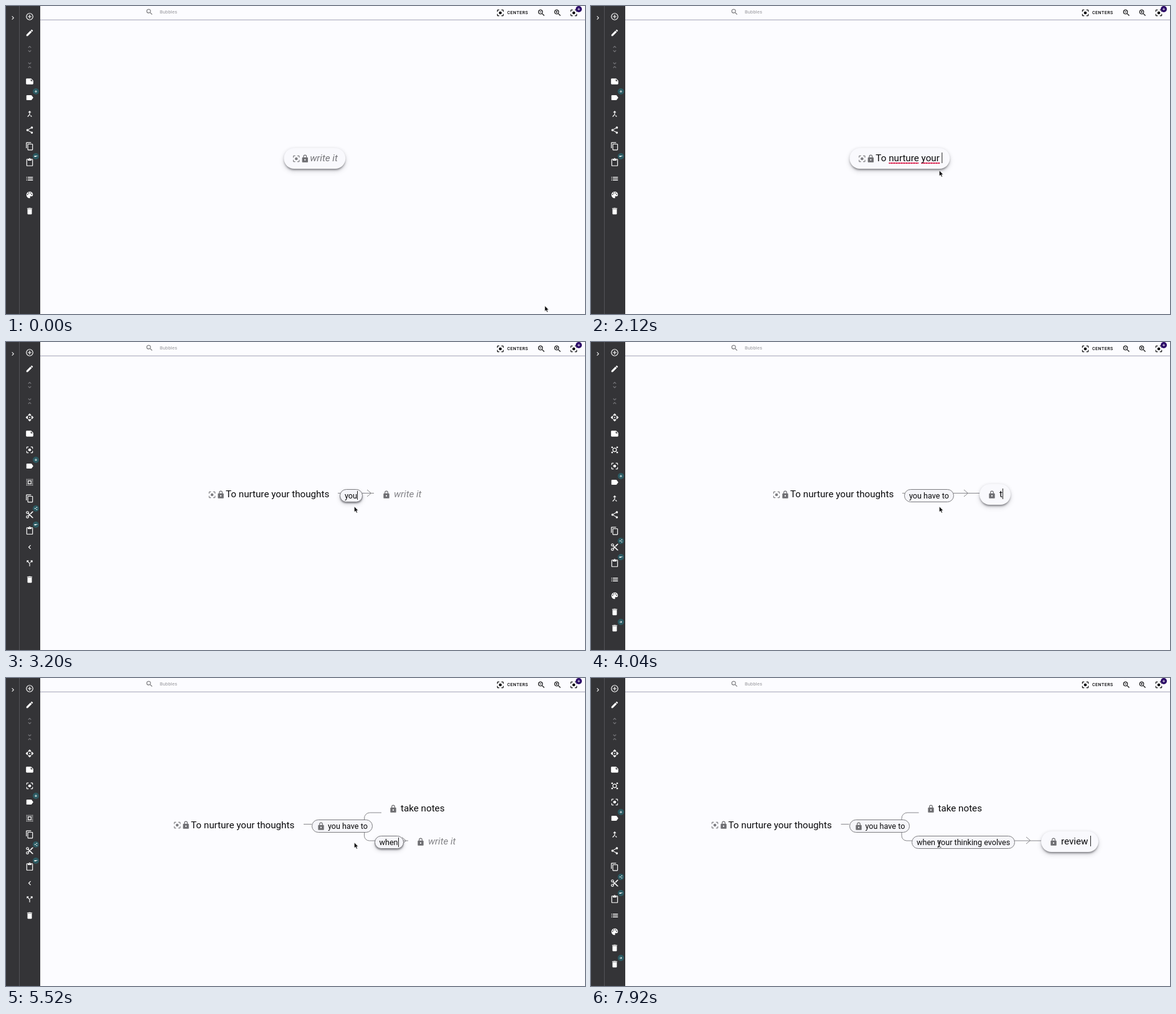
These frames come from a looping animation (930 px wide and 494 px high, 8000 ms). An HTML page:

```html
<!DOCTYPE html>
<html lang="en">
<head>
<meta charset="utf-8">
<title>Bubble map</title>
<style>
html, body { margin: 0; width: 100%; height: 100%; overflow: hidden; background: #fcfcff; }
body { position: relative; font-family: Roboto, Arial, sans-serif; color: #0a0a0c; }
svg { display: block; overflow: visible; fill: currentColor; fill-rule: evenodd; flex: none; }
.at { position: absolute; }
#stage { position: absolute; left: 0; top: 0; width: 930px; height: 494px; overflow: hidden; }
#bar { left: 55px; top: 0; width: 875px; height: 21px; background: #fcfcff; border-bottom: 1px solid #e6e6ee; }
#bar::after { content: ""; position: absolute; left: 0; right: 0; top: 22px; height: 1px; background: #b8b8c6; }
#side { left: 0; top: 0; width: 55px; height: 494px; background: #343437; color: #fff; }
#side::before { content: ""; position: absolute; left: 21px; width: 1px; height: 100%; background: #545458; }
#search { left: 247px; top: 4px; font-size: 7.6px; line-height: 11px; letter-spacing: .1px; color: #98989c; }
#centers { left: 805px; top: 5px; font-size: 7px; line-height: 12px; font-weight: 500; letter-spacing: .52px; }
.badge { width: 10px; height: 10px; border-radius: 50%; background: #2c5a62; color: #fff; display: grid; place-items: center; }
.scene, .tools { inset: 0; }
.wires { left: 0; top: 0; fill: none; stroke: #88888c; stroke-width: 1; }

.node, .label { position: absolute; display: flex; align-items: center; white-space: pre; box-sizing: border-box; }
.node { height: 33px; border-radius: 17px; padding: 0 13px; font-size: 15.2px; line-height: 32px; }
.node svg, .label svg { color: #6e6e72; }
.node.root svg:first-child { color: #808084; }
.node span { margin: 0 0 1px 5px; }
.node.root span { margin-left: 1px; }
.node.on { background: #f9f9fd; box-shadow: 0 3px 3px -1px rgba(60, 60, 66, .5), 0 4px 7px rgba(90, 90, 100, .25), 0 0 4px rgba(120, 120, 130, .14); }
.label { height: 21px; border-radius: 11px; padding: 0 7px; border: 1px solid #7c7c80; background: #f5f5f9; font-size: 12.6px; line-height: 19px; }
.label.hub span { margin-left: 4px; }
.label.edit { padding-right: 8px; box-shadow: 0 2px 2px rgba(60, 60, 66, .42), 0 3px 6px rgba(90, 90, 100, .25); }
em { color: #747478; }
.pale em { color: #838387; }
u { text-decoration: none; background: repeating-linear-gradient(90deg, #d6204c 0 2px, #e4587a 2px 4px) 0 calc(100% - .5px) / 100% 2px no-repeat; }
.caret { display: inline-block; width: 1px; height: 1.12em; margin-right: -1px; vertical-align: -.2em; background: #222; }
#mouse { left: 0; top: 0; }
</style>
</head>
<body>
<div id="stage">
  <div id="bar" class="at"></div>
  <div id="side" class="at"></div>
  <div id="search" class="at">Bubbles</div>
  <div id="centers" class="at">CENTERS</div>
</div>
<script>
const lens = 'M15.5 14h-.79l-.28-.27A6.47 6.47 0 0 0 16 9.5 6.5 6.5 0 1 0 9.5 16c1.61 0 3.09-.59 4.23-1.57l.27.28v.79l5 4.99L20.49 19zm-6 0a4.5 4.5 0 1 1 0-9 4.5 4.5 0 0 1 0 9z';
const icons = {
  add: 'M13 7h-2v4H7v2h4v4h2v-4h4v-2h-4zM12 2a10 10 0 1 0 0 20 10 10 0 0 0 0-20zm0 18a8 8 0 1 1 0-16 8 8 0 0 1 0 16z',
  edit: 'M3 17.25V21h3.75L17.81 9.94l-3.75-3.75zM20.71 7.04a1 1 0 0 0 0-1.41l-2.34-2.34a1 1 0 0 0-1.41 0l-1.83 1.83 3.75 3.75z',
  more: 'M12 5.83L15.17 9l1.41-1.41L12 3 7.41 7.59 8.83 9zm0 12.34L8.83 15l-1.41 1.41L12 21l4.59-4.59L15.17 15z',
  less: 'M7.41 18.59L8.83 20 12 16.83 15.17 20l1.41-1.41L12 14zm9.18-13.18L15.17 4 12 7.17 8.83 4 7.41 5.41 12 10z',
  note: 'M22 10l-6-6H4a2 2 0 0 0-2 2v12a2 2 0 0 0 2 2h16a2 2 0 0 0 2-2zm-7-4.5l5.5 5.5H15z',
  label: 'M17.63 5.84A2 2 0 0 0 16 5H5a2 2 0 0 0-2 2v10a2 2 0 0 0 2 2h11a2 2 0 0 0 1.63-.84L22 12z',
  merge: 'M17 20.41L18.41 19 15 15.59 13.59 17zM7.5 8H11v5.59L5.59 19 7 20.41l6-6V8h3.5L12 3.5z',
  share: 'M18 16.08c-.76 0-1.44.3-1.96.77L8.91 12.7a3 3 0 0 0 0-1.4l7.05-4.11A3 3 0 1 0 15.09 5.7L8.04 9.81a3 3 0 1 0 0 4.38l7.12 4.16A2.92 2.92 0 1 0 18 16.08z',
  copy: 'M16 1H4a2 2 0 0 0-2 2v14h2V3h12zm3 4H8a2 2 0 0 0-2 2v14a2 2 0 0 0 2 2h11a2 2 0 0 0 2-2V7a2 2 0 0 0-2-2zm0 16H8V7h11z',
  paste: 'M19 2h-4.18a3 3 0 0 0-5.64 0H5a2 2 0 0 0-2 2v16a2 2 0 0 0 2 2h14a2 2 0 0 0 2-2V4a2 2 0 0 0-2-2zm-7 0a1 1 0 1 1 0 2 1 1 0 0 1 0-2zm7 18H5V4h2v3h10V4h2z',
  list: 'M3 7h2v2H3zm0 4h2v2H3zm0 4h2v2H3zM7 7h14v2H7zm0 4h14v2H7zm0 4h14v2H7z',
  palette: 'M12 3a9 9 0 0 0 0 18c.83 0 1.5-.67 1.5-1.5 0-.39-.15-.74-.39-1.01-.23-.26-.38-.61-.38-.99 0-.83.67-1.5 1.5-1.5H16a5 5 0 0 0 5-5c0-4.42-4.03-8-9-8zM6.5 9a1.5 1.5 0 1 1 0 3 1.5 1.5 0 0 1 0-3zm3-4a1.5 1.5 0 1 1 0 3 1.5 1.5 0 0 1 0-3zm5 0a1.5 1.5 0 1 1 0 3 1.5 1.5 0 0 1 0-3zm3 4a1.5 1.5 0 1 1 0 3 1.5 1.5 0 0 1 0-3z',
  trash: 'M6 19a2 2 0 0 0 2 2h8a2 2 0 0 0 2-2V7H6zM19 4h-3.5l-1-1h-5l-1 1H5v2h14z',
  focus: 'M12 8a4 4 0 1 0 0 8 4 4 0 0 0 0-8zm-7 7H3v4a2 2 0 0 0 2 2h4v-2H5zM5 5h4V3H5a2 2 0 0 0-2 2v4h2zm14-2h-4v2h4v4h2V5a2 2 0 0 0-2-2zm0 16h-4v2h4a2 2 0 0 0 2-2v-4h-2z',
  lock: 'M18 8h-1V6A5 5 0 0 0 7 6v2H6a2 2 0 0 0-2 2v10a2 2 0 0 0 2 2h12a2 2 0 0 0 2-2V10a2 2 0 0 0-2-2zm-6 9a2 2 0 1 1 0-4 2 2 0 0 1 0 4zm3.1-9H8.9V6a3.1 3.1 0 0 1 6.2 0z',
  move: 'M14 12l-2 2-2-2 2-2zM12 6l2.12 2.12 2.5-2.5L12 1 7.38 5.62l2.5 2.5zM6 12l2.12-2.12-2.5-2.5L1 12l4.62 4.62 2.5-2.5zm12 0l-2.12 2.12 2.5 2.5L23 12l-4.62-4.62-2.5 2.5zm-6 6l-2.12-2.12-2.5 2.5L12 23l4.62-4.62-2.5-2.5z',
  frame: 'M12 6a6 6 0 1 0 0 12 6 6 0 0 0 0-12zm0 2a4 4 0 1 1 0 8 4 4 0 0 1 0-8zM3 3h4v4H3zm14 0h4v4h-4zM3 17h4v4H3zm14 0h4v4h-4z',
  all: 'M3 3h2v2H3zm4 0h2v2H7zm4 0h2v2h-2zm4 0h2v2h-2zm4 0h2v2h-2zM3 7h2v2H3zm0 4h2v2H3zm0 4h2v2H3zm0 4h2v2H3zM19 7h2v2h-2zm0 4h2v2h-2zm0 4h2v2h-2zm0 4h2v2h-2zM7 19h2v2H7zm4 0h2v2h-2zm4 0h2v2h-2zM7 7h10v10H7zm2 2v6h6V9z',
  cut: 'M9.64 7.64A4 4 0 1 0 7.64 9.64L10 12l-2.36 2.36a4 4 0 1 0 2 2L12 14l7 7h3v-1zM6 8a2 2 0 1 1 0-4 2 2 0 0 1 0 4zm0 12a2 2 0 1 1 0-4 2 2 0 0 1 0 4zM19 3l-6 6 2 2 7-7V3z',
  left: 'M15.41 7.41L14 6l-6 6 6 6 1.41-1.41L10.83 12z',
  right: 'M8.59 16.59L10 18l6-6-6-6-1.41 1.41L13.17 12z',
  split: 'M14 4l2.29 2.29-2.88 2.88 1.42 1.42 2.88-2.88L20 10V4zm-4 0H4v6l2.29-2.29 4.71 4.7V20h2v-8.41l-5.29-5.3z',
  search: lens,
  zoomOut: lens + 'M7 8.6h5v1.6H7z',
  zoomIn: lens + 'M12 10.2h-1.7v1.8H8.7v-1.8H7V8.6h1.7V7h1.6v1.6H12z',
  plus: 'M20 13.5h-6.5V20h-3v-6.5H4v-3h6.5V4h3v6.5H20z',
  minus: 'M2 9h20v3H14v4H2z',
  arrow: 'M3 10.5h11L10 7l2-2 8 7-8 7-2-2 4-3.5H3z'
};
const stage = document.getElementById('stage');
const side = document.getElementById('side');

const icon = (name, size = 14) =>
  `<svg width="${size}" height="${size}" viewBox="0 0 24 24"><path d="${icons[name]}"/></svg>`;

function add(parent, cls, html = '', style = '') {
  const el = document.createElement('div');
  el.className = cls;
  el.innerHTML = html;
  el.style.cssText = style;
  parent.append(el);
  return el;
}
const iconAt = (parent, name, x, y, size = 14, color = 'inherit') =>
  add(parent, 'at', icon(name, size), `left:${x - size / 2}px;top:${y - size / 2}px;color:${color}`);
const badgeAt = (parent, name, x, y, color = '') =>
  add(parent, 'at badge', icon(name, 6), `left:${x - 5}px;top:${y - 5}px;background:${color}`);

// Fixed chrome
iconAt(side, 'right', 11, 19, 12);
iconAt(stage, 'search', 230, 9, 13, '#77777b');
iconAt(stage, 'focus', 794, 11);
iconAt(stage, 'zoomOut', 860, 11);
iconAt(stage, 'zoomIn', 886, 11);
iconAt(stage, 'focus', 912, 11);
badgeAt(stage, 'plus', 920, 5, '#2c0a68');

// Tool columns: "icon" or "icon:badge"
const dim = { more: '#77777b', less: '#77777b' };
const tools = [
  'note label:plus merge share copy paste:minus list palette trash',
  'move note focus label:plus all copy cut:share paste:minus left split trash',
  'move note frame focus label:plus merge share copy cut:share paste:minus list palette trash trash:arrow'
].map(names => {
  const col = add(side, 'at tools');
  ('add edit more less ' + names).split(' ').forEach((item, i) => {
    const [name, badge] = item.split(':');
    const y = 17 + 26 * i;
    iconAt(col, name, 38, y, 14, dim[name]);
    if (badge) badgeAt(col, badge, 48, y - 10);
  });
  return col;
});

// Typed text: runs are [start, ms per letter, letters]
const fields = [];
function fill(el, text) {
  if (typeof text === 'string') el.innerHTML = text;
  else fields.push({ el, shown: -1, ...text });
}
function showField(f, t) {
  const n = f.runs.reduce((sum, [start, step, len]) =>
    sum + Math.max(0, Math.min(len, Math.floor((t - start) / step) + 1)), 0);
  if (n === f.shown) return;
  f.shown = n;
  let html = f.text.slice(0, n);
  if (!f.plain) html = html.replace(/\S{3,}(?=\s)/g, '<u>$&</u>');
  f.el.innerHTML = n || !f.hint ? html + '<i class="caret"></i>' : f.hint;
}

function box(scene, cls, names, x, y, text) {
  const el = add(scene, cls, names.map(n => icon(n)).join('') + '<span></span>', `left:${x}px;top:${y}px`);
  fill(el.lastChild, text);
  return el;
}
const root = (scene, x, y, text, cls = '') => box(scene, 'node root ' + cls, ['focus', 'lock'], x - 42, y - 16, text);
const leaf = (scene, x, y, text, cls = '') => box(scene, 'node pale ' + cls, ['lock'], x - 32, y - 16, text);
const label = (scene, x, y, text, cls = '', names = []) => box(scene, 'label ' + cls, names, x, y - 10.5, text);
const scene = (wires = '') =>
  add(stage, 'at scene', `<svg class="at wires" width="930" height="494"><path d="${wires}"/></svg>`);
const chevron = (x, y) => `M${x - 7} ${y - 5.5}l6.5 5.5-6.5 5.5`;

const hint = '<em>write it</em>';
const first = 'To nurture your thoughts', link = 'you have to', notes = 'take notes', when = 'when your thinking evolves';
const fork = dx => `M${478 + dx} 234.5h13M${575.5 + dx} 228v-3a9 9 0 0 1 9-9h18.5M${575.5 + dx} 248v5a8 8 0 0 0 8 8`;

const s0 = scene();
root(s0, 0, 244, { text: first, hint, runs: [[720, 84, 10], [1600, 96, 6], [2160, 40, 8]] }, 'on')
  .style.cssText += 'left:496px;transform:translateX(-50%)';

const s1 = scene('M533 242.5h58' + chevron(587, 242.5));
root(s1, 353, 244, first);
leaf(s1, 623, 244, hint);
label(s1, 536, 246, { text: link, runs: [[3000, 80, 3], [3240, 74, 8]] }, 'edit');

const s2 = scene('M500 242.5h124' + chevron(606, 242.5));
root(s2, 320, 244, first);
label(s2, 503, 246, link);
leaf(s2, 656, 244, { text: notes, hint, runs: [[4040, 66, 10]] }, 'on');

function tree(dx, tail) {
  const s = scene(fork(dx) + tail);
  root(s, 297 + dx, 235.5, first);
  label(s, 491 + dx, 237.5, link, 'hub', ['lock']);
  leaf(s, 634 + dx, 209, notes);
  return s;
}
const s3 = tree(0, 'H646' + chevron(643, 261));
leaf(s3, 678, 262, hint);
label(s3, 591.5, 263.5, { text: when, runs: [[5400, 40, 4], [5560, 55, 22]] }, 'edit');

const s4 = tree(-76.5, 'H723' + chevron(706, 260.5));
label(s4, 515, 263.5, when);
leaf(s4, 755, 262, { text: 'review ', hint, plain: true, runs: [[7440, 40, 2], [7680, 60, 5]] }, 'on');

const scenes = [[0, s0], [2680, s1], [3920, s2], [4960, s3], [6920, s4]];
const columns = [[0, tools[0]], [2680, tools[2]], [3000, tools[1]], [3920, tools[2]], [5400, tools[1]], [6920, tools[2]]];

// Mouse pointer
const mouse = add(stage, 'at', '<svg width="10" height="14"><path d="M0 0v8.6l2-1.8 1.5 3.2 1.4-.6-1.4-3.1h2.6z" fill="#0a0a0c" stroke="#fff" stroke-width=".4"/><path d="M-3 -3.5q2.5 0 3 1 .5-1 3-1M0-2.5v9M-3 7.5q2.5 0 3-1 .5 1 3 1" fill="none" stroke="#333336"/></svg>');
mouse.id = 'mouse';
const [pointer, beam] = mouse.querySelectorAll('path');

function showOne(list, t) {
  const now = list.filter(([start]) => t >= start).pop()[1];
  list.forEach(([, el]) => { el.style.display = el === now ? '' : 'none'; });
}
function draw(t) {
  showOne(scenes, t);
  showOne(columns, t);
  fields.forEach(f => showField(f, t));
  const p = Math.min(1, Math.floor(t / 40) / 4);
  mouse.style.transform = `translate(${865.5 - 306 * p}px, ${481 - 217 * p}px)`;
  const overText = t >= 6920;
  pointer.style.display = overText ? 'none' : '';
  beam.style.display = overText ? '' : 'none';
}
const begin = performance.now();
function tick() {
  draw((performance.now() - begin) % 8000);
  requestAnimationFrame(tick);
}
tick();
</script>
</body>
</html>
```
